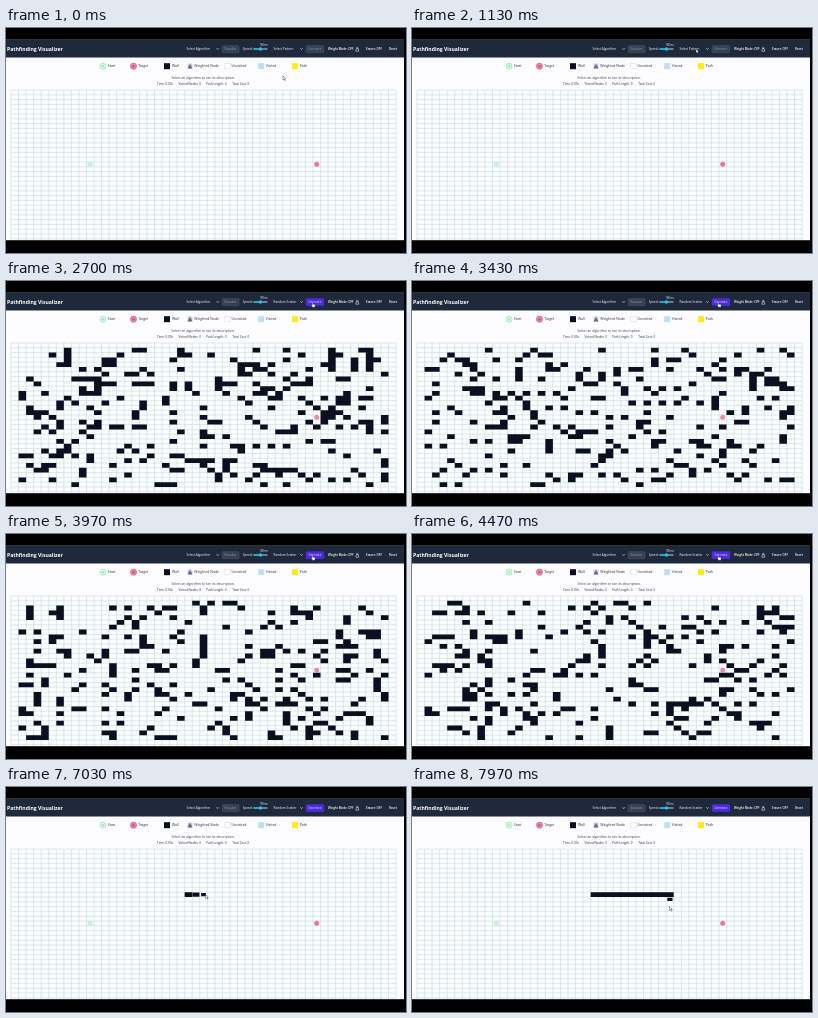
Recreate the animation shown at these times as an HTML page. Size 400 px wide and 225 px high, loop 8000 ms.

```html
<!DOCTYPE html>
<html lang="en">
<head>
<meta charset="utf-8">
<title>Pathfinding Visualizer</title>
<style>
  html, body { margin: 0; width: 100%; height: 100%; overflow: hidden; background: #000; }
  svg { display: block; width: 100vw; height: 100vh; font-family: "Open Sans", "Noto Sans", sans-serif; }
</style>
</head>
<body>
<svg id="stage" viewBox="0 0 400 225">
  <rect y="11.8" width="398" height="200.4" fill="#fdfdff"/>
  <rect y="11.8" width="398" height="17.7" fill="#1e293b"/>

  <g id="buttons" stroke-width=".4">
    <rect x="216" y="17.6" width="17.2" height="7.2" rx="1.2" fill="#364154" stroke="#4d596b"/>
    <rect id="generate" x="300" y="17.6" width="18" height="7.2" rx="1.2"/>
  </g>
  <path d="M210.6 20.4l1.1 1.1l1.1-1.1M294.4 20.4l1.1 1.1l1.1-1.1" fill="none" stroke="#f0f3f7" stroke-width=".7"/>
  <path d="M247.5 21h14" stroke="#c3d3e0" stroke-width="1"/>
  <path d="M247.5 21h7" stroke="#12b5e5" stroke-width="1.3"/>
  <circle cx="254.5" cy="21" r="1.7" fill="#22c3ee"/>
  <path d="M349.8 23.2l.5-2.6h2l.5 2.6z" fill="none" stroke="#fff" stroke-width=".5"/>
  <circle cx="351.3" cy="19.8" r=".7" fill="none" stroke="#fff" stroke-width=".4"/>

  <g id="legend">
    <circle cx="97" cy="38.2" r="3" fill="#e3fbec" stroke="#8fe3ae" stroke-width=".7"/>
    <path d="M95.5 38.2h3M97 36.7v3" stroke="#78d69b" stroke-width=".6"/>
    <circle cx="127.5" cy="38.2" r="3.1" fill="#e58aa6" stroke="#cf5f83" stroke-width=".6"/>
    <circle cx="127.5" cy="38.2" r="1.3" fill="#cc5a80"/>
    <rect x="158" y="35.2" width="6" height="6" fill="#0a1020"/>
    <rect x="181.2" y="35.4" width="5.6" height="5.6" fill="#e4e4f0"/>
    <path d="M181.8 40.5l1-3.3h2.4l1 3.3z" fill="#666a8c"/>
    <circle cx="184" cy="36.8" r=".9" fill="none" stroke="#666a8c" stroke-width=".5"/>
    <rect x="218.8" y="35.4" width="5.4" height="5.4" fill="#fff" stroke="#cddbe2" stroke-width=".5"/>
    <rect x="252.2" y="35.2" width="6" height="6" fill="#bfdff8"/>
    <rect x="286" y="35.2" width="6" height="6" fill="#ffe91f"/>
  </g>

  <g id="labels"></g>
  <rect x="5" y="62" width="385" height="150" fill="#fcfefe"/>
  <path id="grid" fill="none" stroke="#b9d2d7" stroke-width=".5"/>
  <path id="walls" fill="#0a1020"/>
  <circle id="startNode" cx="84.2" cy="136.3" r="2.2" fill="#c9f5d8" stroke="#a0e6b9" stroke-width=".5"/>
  <circle id="targetNode" cx="310.7" cy="136.3" r="2.2" fill="#e27d9c" stroke="#cf5f83" stroke-width=".5"/>
  <g id="cursor" fill="#fff" stroke="#222" stroke-width=".4" stroke-linejoin="round">
    <path id="arrow" d="M0 0v3.9l.9-.8l.7 1.5l.7-.3l-.7-1.5h1.2z"/>
    <path id="hand" d="M-.4 .3q.4-.6 .8 0v2l1.8 .4q.5 .2 .4 .8l-.4 2h-2.2l-1.5-2.2q0-.6 .6-.4l.5 .4z"/>
  </g>
</svg>
<script>
const $ = id => document.getElementById(id);
const LOOP = 8000, COLS = 51, ROWS = 31, LEFT = 5, TOP = 62, CELL_W = 7.55, CELL_H = 4.8;
const POP = 300, RESET = 5600, PICK = 1450, DENSITY = .18;
const CLICKS = [2330, 3100, 3630, 4170, 4680];
const DRAG = [6730, 7880];

function label(text, x, y, size, fill = '#fff', weight = 400) {
  const el = document.createElementNS('http://www.w3.org/2000/svg', 'text');
  Object.entries({ x, y, fill, 'font-size': size, 'font-weight': weight })
    .forEach(([key, value]) => el.setAttribute(key, value));
  el.textContent = text;
  $('labels').append(el);
  return el;
}

label('Pathfinding Visualizer', 1, 23, 5.1, '#fff', 700);
label('Select Algorithm', 180.5, 22.2, 3.1);
label('Visualize', 218.2, 22.2, 3, '#8f9bab');
label('Speed:', 236.7, 22.2, 3.1);
label('180ms', 253.6, 18, 2.6, '#e8edf3');
const pattern = label('', 267.5, 22.2, 3.1);
const generateText = label('Generate', 302.6, 22.2, 2.95);
label('Weight Mode: OFF', 322, 22.2, 2.95, '#fff', 600);
label('Eraser: OFF', 360, 22.2, 2.95, '#fff', 600);
const reset = label('Reset', 383, 22.2, 2.95, '#fff', 600);

[['Start', 101.8], ['Target', 132.3], ['Wall', 166], ['Weighted Node', 188.3],
 ['Unvisited', 225.5], ['Visited', 259.8], ['Path', 293.8]]
  .forEach(([text, x]) => label(text, x, 39.4, 3.45, '#27303f'));
label('Select an algorithm to see its description.', 165.5, 50.6, 3.3, '#394150');
[['Time: 0.00s', 151], ['Visited Nodes: 0', 172.5], ['Path Length: 0', 200.3], ['Total Cost: 0', 226.2]]
  .forEach(([text, x]) => label(text, x, 57.3, 3, '#27303f'));

let lines = '';
for (let c = 0; c <= COLS; c++) lines += `M${LEFT + c * CELL_W} ${TOP}V212`;
for (let r = 0; r <= ROWS; r++) lines += `M${LEFT} ${TOP + r * CELL_H}H390`;
$('grid').setAttribute('d', lines);

// Cursor waypoints: time, x, y
const WAY = [
  [300, 277, 48], [1050, 284, 21], [1250, 284, 21], [1500, 281, 27], [1930, 304.7, 21.5],
  [2130, 304.7, 21.5], [2300, 306.6, 20.8], [5000, 306.6, 20.8], [5450, 385, 22], [5900, 385, 22],
  [6470, 180, 107.3], [6730, 180, 107.3], [7030, 199.5, 107.5], [7530, 253, 107.5],
  [7700, 258, 107.5], [7780, 258, 107.5], [7870, 258, 110], [7970, 257.5, 119.5]
];

function cursorAt(t) {
  const next = WAY.findIndex(w => w[0] > t);
  if (next === 0) return WAY[0].slice(1);
  if (next < 0) return WAY.at(-1).slice(1);
  const [t0, x0, y0] = WAY[next - 1], [t1, x1, y1] = WAY[next];
  let p = (t - t0) / (t1 - t0);
  if (t < DRAG[0]) p = p * p * (3 - 2 * p);
  return [x0 + (x1 - x0) * p, y0 + (y1 - y0) * p];
}

function random(seed) {
  return () => {
    seed = (seed + 0x6D2B79F5) | 0;
    let n = Math.imul(seed ^ seed >>> 15, 1 | seed);
    n = n + Math.imul(n ^ n >>> 7, 61 | n) ^ n;
    return ((n ^ n >>> 14) >>> 0) / 4294967296;
  };
}

function scatter(born, index) {
  const next = random(index * 97 + 11), cells = [];
  for (let r = 1; r < 30; r++)
    for (let c = 1; c < 50; c++)
      if (next() < DENSITY && !(r === 15 && (c === 10 || c === 40))) cells.push({ c, r, born });
  return cells;
}
const patterns = CLICKS.map(scatter);

// Every cell the cursor enters while drawing becomes a wall
const drawn = new Map();
for (let t = DRAG[0]; t < DRAG[1]; t += 5) {
  const [x, y] = cursorAt(t);
  const c = Math.floor((x - LEFT) / CELL_W), r = Math.floor((y - TOP) / CELL_H);
  const key = c + ',' + r;
  if (!drawn.has(key)) drawn.set(key, { c, r, born: t });
}
const drawnWalls = [...drawn.values()];

function wallPath({ c, r, born }, t) {
  if (t < born) return '';
  const p = Math.min(1, (t - born) / POP), scale = 1 - .7 * (1 - p) ** 2;
  const w = CELL_W * scale, h = CELL_H * scale;
  const x = LEFT + (c + .5) * CELL_W - w / 2, y = TOP + (r + .5) * CELL_H - h / 2;
  return `M${x.toFixed(2)} ${y.toFixed(2)}h${w.toFixed(2)}v${h.toFixed(2)}h${(-w).toFixed(2)}z`;
}

function draw(t) {
  const latest = CLICKS.filter(click => click <= t).length - 1;
  const scattered = latest >= 0 && t < RESET;
  const walls = scattered ? patterns[latest] : drawnWalls;
  $('walls').setAttribute('d', walls.map(wall => wallPath(wall, t)).join(''));
  $('startNode').setAttribute('opacity', scattered ? .35 : 1);
  $('targetNode').setAttribute('opacity', scattered ? .85 : 1);

  const picked = t >= PICK;
  pattern.textContent = picked ? 'Random Scatter' : 'Select Pattern';
  $('generate').setAttribute('fill', picked ? '#4f2be0' : '#364154');
  $('generate').setAttribute('stroke', picked ? '#4f2be0' : '#4d596b');
  generateText.setAttribute('fill', picked ? '#e6e0ff' : '#8f9bab');

  const [x, y] = cursorAt(t);
  const inBar = y > 17 && y < 25, overReset = inBar && x > 382;
  const pointing = overReset || inBar && x > 300 && x < 318;
  reset.setAttribute('fill', overReset ? '#4da3e8' : '#fff');
  $('cursor').setAttribute('transform', `translate(${x} ${y})`);
  $('hand').style.display = pointing ? '' : 'none';
  $('arrow').style.display = pointing ? 'none' : '';
}

const start = performance.now();
function tick() {
  draw((performance.now() - start) % LOOP);
  requestAnimationFrame(tick);
}
tick();
</script>
</body>
</html>
```
